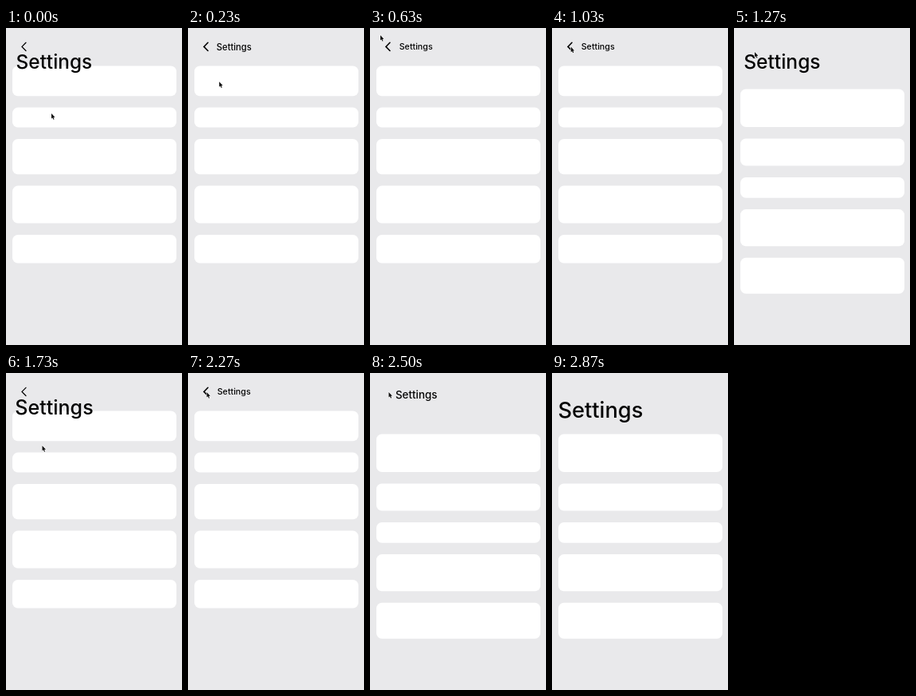
These frames come from a looping animation (221x397 px, 3430 ms). An HTML page with a canvas:

```html
<!DOCTYPE html>
<html lang="en">
<head>
<meta charset="utf-8">
<title>Settings transition</title>
<style>
  html, body { margin: 0; width: 100%; height: 100%; overflow: hidden; background: #e9e9eb; }
  canvas { display: block; width: 221px; height: 397px; }
</style>
</head>
<body>
<canvas id="stage"></canvas>
<script>
const W = 221, H = 397, LOOP = 3430;
const MARGIN = 8, GAP = 14.4, RADIUS = 7;
const MOVE = 470, POINTER_END = 2850;

const canvas = document.getElementById('stage');
const ratio = window.devicePixelRatio || 1;
canvas.width = Math.round(W * ratio);
canvas.height = Math.round(H * ratio);
const ctx = canvas.getContext('2d');

const HOME = { top: 76.5, heights: [47.5, 34.2, 25.7, 46.2, 45], weight: 450 };
const DETAIL = { top: 47.5, heights: [37.7, 25, 44.2, 47, 35.5], weight: 500 };

const LARGE = { x: 7.4, y: 55.9, size: 27.3 };
const SMALL = { x: 36.7, y: 27.4, size: 10.7 };

const NAV = [
  { at: -37, page: DETAIL },
  { at: 1108, page: HOME },
  { at: 1699, page: DETAIL },
  { at: 2465, page: HOME }
];

// Where the pointer heads, and when it sets off
const REST = { x: 57, y: 107 };
const MOVES = [
  { at: 20, x: 13, y: 9 },
  { at: 630, x: 24, y: 24 },
  { at: 1160, x: 45.5, y: 91 },
  { at: 1715, x: 23.5, y: 24 },
  { at: 2460, x: 25, y: 6 }
];

const lerp = (a, b, k) => a + (b - a) * k;
const clamp = k => Math.min(1, Math.max(0, k));
const ease = k => k * k * k * (k * (6 * k - 15) + 10);

// Critically damped spring, stiffness 400
function spring(ms) {
  const u = ms * 0.02;
  return 1 - (1 + u) * Math.exp(-u);
}

function trace(points) {
  ctx.beginPath();
  for (const [x, y] of points) ctx.lineTo(x, y);
}

function drawCards({ top, heights }) {
  ctx.fillStyle = '#fff';
  let y = top;
  for (const h of heights) {
    ctx.beginPath();
    ctx.roundRect(MARGIN, y, 206, h, RADIUS);
    ctx.fill();
    y += h + GAP;
  }
}

function drawBack(k) {
  ctx.strokeStyle = '#000';
  ctx.lineWidth = lerp(1.15, 1.6, k);
  ctx.lineCap = 'round';
  ctx.lineJoin = 'miter';
  trace([[25, 18.3], [20, 23.4], [25, 28.5]]);
  ctx.stroke();
}

function drawTitle(weight, k) {
  const scale = lerp(LARGE.size, SMALL.size, k) / LARGE.size;
  ctx.save();
  ctx.translate(lerp(LARGE.x, SMALL.x, k), lerp(LARGE.y, SMALL.y, k));
  ctx.scale(scale, scale);
  ctx.font = `${weight} ${LARGE.size}px Inter, sans-serif`;
  ctx.fillStyle = '#050505';
  ctx.fillText('Settings', 0, 0);
  ctx.restore();
}

function pointerAt(t) {
  return MOVES.reduce((p, m) => {
    const k = ease(clamp((t - m.at) / MOVE));
    return { x: lerp(p.x, m.x, k), y: lerp(p.y, m.y, k) };
  }, REST);
}

function drawPointer(t) {
  if (t >= POINTER_END) return;
  const { x, y } = pointerAt(t);
  ctx.save();
  ctx.translate(x, y);
  ctx.scale(0.88, 0.88);
  trace([[0, 0], [0, 7.4], [1.6, 6], [2.9, 8.8], [4.1, 8.2], [2.9, 5.6], [5.1, 5.4]]);
  ctx.closePath();
  ctx.lineJoin = 'round';
  ctx.lineWidth = 1.3;
  ctx.strokeStyle = '#fff';
  ctx.stroke();
  ctx.fillStyle = '#111';
  ctx.fill();
  ctx.restore();
}

function draw(t) {
  const { at, page } = NAV.filter(n => n.at <= t).pop();
  const k = spring(t - at);

  ctx.setTransform(ratio, 0, 0, ratio, 0, 0);
  ctx.fillStyle = '#e9e9eb';
  ctx.fillRect(0, 0, W, H);
  drawCards(page);
  if (page === DETAIL) drawBack(k);
  drawTitle(page.weight, page === DETAIL ? k : 1 - k);
  drawPointer(t);
}

const start = performance.now();
function tick() {
  draw((performance.now() - start) % LOOP);
  requestAnimationFrame(tick);
}
tick();
</script>
</body>
</html>
```
